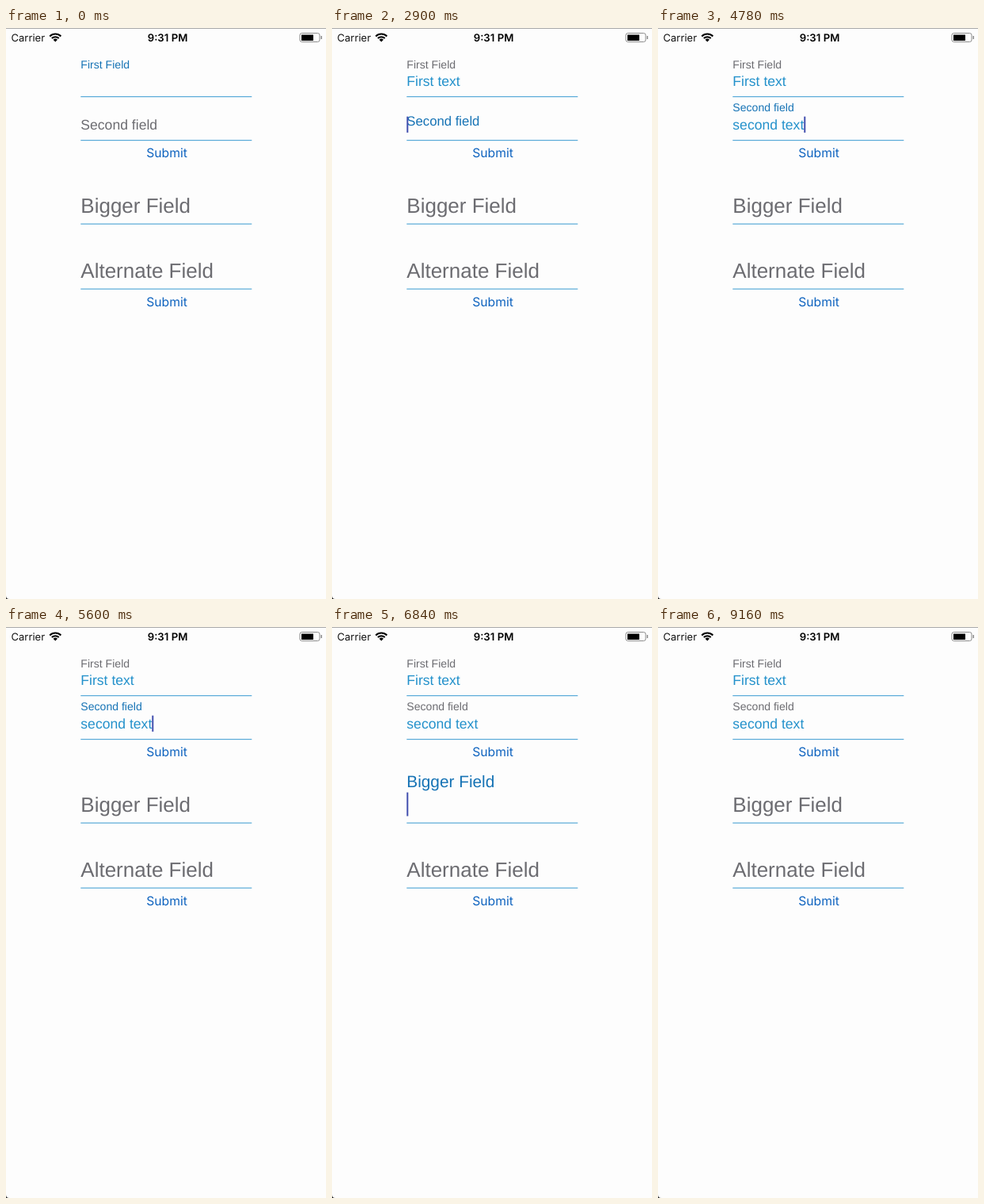
These frames come from a looping animation (404x720 px, 9.18 s). An HTML page with a canvas:

```html
<!DOCTYPE html>
<html lang="en">
<head>
<meta charset="utf-8">
<title>Floating label fields</title>
<style>
  html, body { margin: 0; height: 100%; overflow: hidden; background: #fdfdfd; }
  canvas { display: block; width: 404px; height: 720px; }
</style>
</head>
<body>
<canvas width="404" height="720"></canvas>
<script>
const ctx = document.querySelector('canvas').getContext('2d');
ctx.textRendering = 'geometricPrecision';

const LOOP = 9180, LEFT = 94.3, FLOAT_MS = 300, KEY_MS = 110, BLINK_MS = 500;
const SANS = '"Liberation Sans", Arial, sans-serif';
const UI = 'Inter, sans-serif';
const RESTING = '#6c6c71', ACTIVE = '#1673b5', VALUE = '#2391cb';
const RULE = '#58aad8', CARET = '#424fae', BUTTON = '#0e63bf';

// Baselines: base = resting label and value, top = floated label.
const fields = [
  { label: 'First Field', value: 'First text', size: 17.6, base: 73.2, top: 50.5, line: 86.5,
    focus: -BLINK_MS, blur: 2805, typeAt: 1200 },
  { label: 'Second field', value: 'second text', size: 17.6, base: 128.2, top: 105.3, line: 141.5,
    focus: 2805, blur: 5800, typeAt: 3400 },
  { label: 'Bigger Field', value: '', size: 26, base: 233, top: 202, line: 247,
    focus: 5800, blur: 6900 },
  { label: 'Alternate Field', value: '', size: 26, base: 315, top: 284, line: 329,
    focus: 6900, blur: 8500 }
];

const clamp = (v, lo = 0, hi = 1) => Math.min(hi, Math.max(lo, v));
const ease = p => p * p * (3 - 2 * p);
const floatProgress = (t, start) => ease(clamp((t - start) / FLOAT_MS));

function text(str, x, y, size, color, family = SANS, weight = 400, align = 'left') {
  ctx.font = `${weight} ${size}px ${family}`;
  ctx.textAlign = align;
  ctx.fillStyle = color;
  ctx.fillText(str, x, y);
}

function rect(x, y, w, h, color) {
  ctx.fillStyle = color;
  ctx.fillRect(x, y, w, h);
}

function drawStatusBar() {
  rect(0, 0, 404, 1, '#a8a8a8');
  text('Carrier', 6.5, 17, 13, '#111', UI);
  text('9:31 PM', 204, 17, 13.2, '#000', UI, 600, 'center');

  ctx.strokeStyle = ctx.fillStyle = '#000';
  ctx.lineWidth = 2;
  for (const r of [10, 6.3]) {
    ctx.beginPath();
    ctx.arc(62.3, 17.5, r, -Math.PI * 0.75, -Math.PI * 0.25);
    ctx.stroke();
  }
  ctx.beginPath();
  ctx.moveTo(62.3, 17.5);
  ctx.arc(62.3, 17.5, 3.8, -Math.PI * 0.75, -Math.PI * 0.25);
  ctx.fill();

  ctx.strokeStyle = '#8c8c8c';
  ctx.lineWidth = 1;
  ctx.beginPath();
  ctx.roundRect(371, 6.5, 25, 11, 2.5);
  ctx.stroke();
  rect(373, 8.5, 15, 7.5, '#000');
  rect(397.5, 10, 1.5, 4, '#8c8c8c');
}

function drawField(f, t) {
  const focused = t >= f.focus && t < f.blur;
  const typed = f.value ? clamp(Math.floor((t - f.typeAt) / KEY_MS) + 1, 0, f.value.length) : 0;
  const value = f.value.slice(0, typed);

  // Empty fields drop their label again on blur.
  const raised = floatProgress(t, f.focus) - (f.value ? 0 : floatProgress(t, f.blur));
  const y = f.base + (f.top - f.base) * raised;
  text(f.label, LEFT, y, f.size * (1 - 0.2 * raised), focused ? ACTIVE : RESTING);
  text(value, LEFT, f.base, f.size, VALUE);
  rect(LEFT, f.line - 0.5, 216, 1.2, RULE);

  const lastKey = typed ? f.typeAt + (typed - 1) * KEY_MS : f.focus;
  if (focused && (t - lastKey) % (2 * BLINK_MS) < BLINK_MS) {
    ctx.font = `${f.size}px ${SANS}`;
    const x = LEFT + ctx.measureText(value).width;
    rect(x, f.base - f.size * 0.94, 2, f.size * 1.15, CARET);
  }
}

function draw(now) {
  const t = now % LOOP;
  rect(0, 0, 404, 720, '#fdfdfd');
  drawStatusBar();
  for (const f of fields) drawField(f, t);
  for (const y of [163, 350.5]) text('Submit', 203, y, 15.7, BUTTON, UI, 400, 'center');

  // Dark sliver of the rounded screen corner.
  ctx.fillStyle = '#222';
  ctx.beginPath();
  ctx.moveTo(0, 716);
  ctx.quadraticCurveTo(0, 720, 4, 720);
  ctx.lineTo(0, 720);
  ctx.fill();
}

const start = performance.now();
function tick() {
  draw(performance.now() - start);
  requestAnimationFrame(tick);
}
tick();
</script>
</body>
</html>
```
